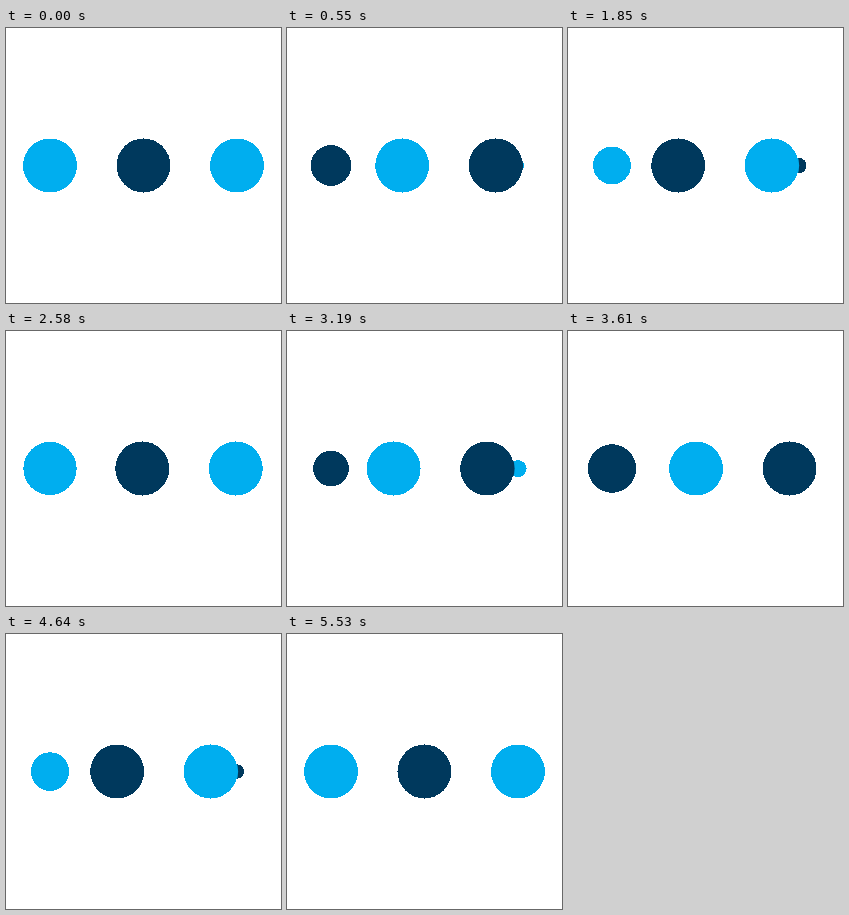
Write an HTML page that moves like this. It is 275x275 px and loops after 5560 ms.

```html
<!DOCTYPE html>
<html lang="en">
<head>
<meta charset="utf-8">
<title>Loading dots</title>
<style>
  html, body { margin: 0; width: 100%; height: 100%; overflow: hidden; background: #fff; }
  svg { display: block; width: 100vw; height: 100vh; }
  .light { fill: #00aeef; }
  .dark { fill: #00395d; }
</style>
</head>
<body>
<svg viewBox="0 0 100 100">
  <!-- Hard edges: only fully covered pixels stay. -->
  <filter id="hard" filterUnits="userSpaceOnUse" x="0" y="0" width="100" height="100"
          color-interpolation-filters="sRGB">
    <feComponentTransfer><feFuncA type="linear" slope="200" intercept="-197"/></feComponentTransfer>
  </filter>
  <g filter="url(#hard)">
    <circle id="leaving" cx="84" cy="50" r="10" class="light"/>
    <circle cy="50" class="dot light"/>
    <circle cy="50" class="dot dark"/>
    <circle cy="50" class="dot light"/>
    <circle cy="50" class="dot dark"/>
  </g>
</svg>
<script>
  const LOOP = 5560, TICKS = 183, TICK = 5000 / 0.9 / TICKS;
  const leaving = document.getElementById('leaving');
  const dots = document.querySelectorAll('.dot');

  // cubic-bezier(0, .5, .5, 1)
  function ease(x) {
    let lo = 0, hi = 1;
    for (let i = 0; i < 30; i++) {
      const u = (lo + hi) / 2;
      if (1.5 * u * u - 0.5 * u ** 3 < x) lo = u; else hi = u;
    }
    return 1.5 * lo - 0.5 * lo ** 3;
  }

  // Each dot waits, grows on the left, then hops twice to the right.
  function pose(stage, p) {
    if (stage === 0) return [16, 0];
    if (stage === 1) return [16, 10 * p];
    return [16 + 34 * (stage - 2 + p), 10];
  }

  function draw(now) {
    // Motion is held at about 33 poses a second, on a 10 ms clock.
    const clock = Math.floor((now % LOOP) / 10) * 10;
    const tick = Math.min(TICKS - 1, Math.ceil((clock + 5) / TICK) - 1);
    const phase = tick / TICKS * 4;
    const step = Math.floor(phase);
    const p = ease(phase - step);

    leaving.setAttribute('r', 10 * (1 - p));
    leaving.setAttribute('class', step % 2 ? 'dark' : 'light');
    dots.forEach((dot, i) => {
      const [x, r] = pose((step + i) % 4, p);
      dot.setAttribute('cx', x);
      dot.setAttribute('r', r);
    });
  }

  function loop() {
    draw(performance.now());
    requestAnimationFrame(loop);
  }
  loop();
</script>
</body>
</html>
```
